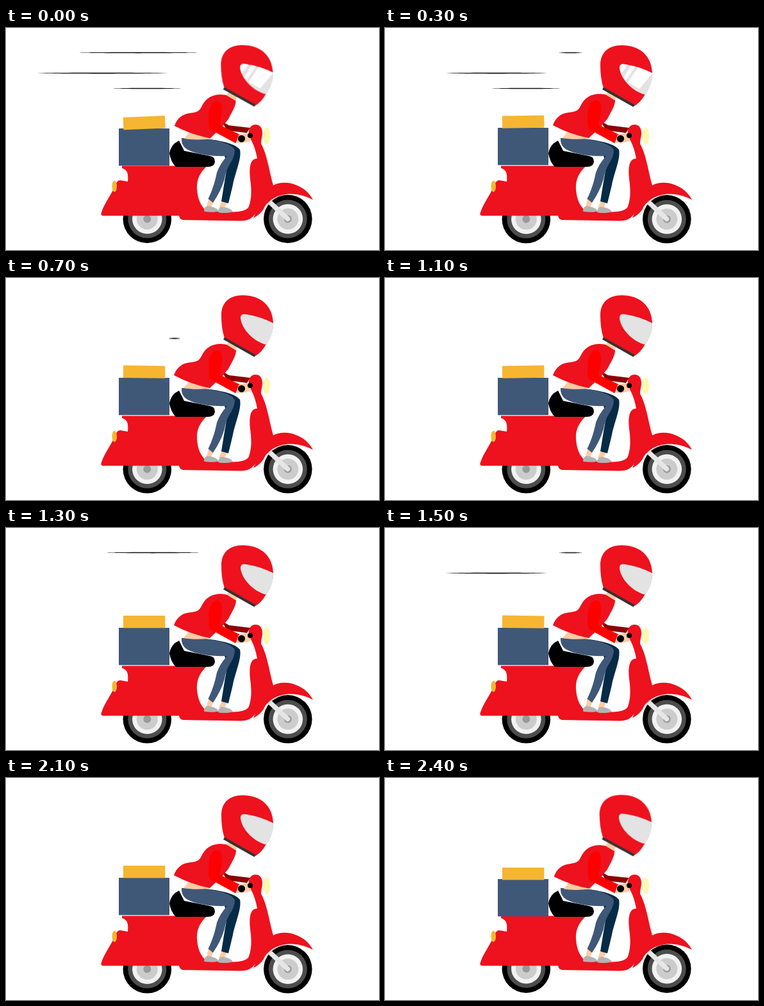
These frames come from a looping animation (582 px wide and 347 px high, 2.5 s). An HTML page without scripts:

```html
<!DOCTYPE html>
<html lang="en">
<head>
<meta charset="utf-8">
<title>Scooter delivery</title>
<style>
  /* --drop: 0 = rider lifted, 1 = rider settled */
  @property --drop { syntax: "<number>"; inherits: true; initial-value: 0; }
  @property --tilt { syntax: "<angle>"; inherits: true; initial-value: 0deg; }

  html, body { margin: 0; width: 100%; height: 100%; overflow: hidden; background: #fff; }
  svg { display: block; width: 582px; height: 347px; }

  .scene, .wind path, .shine { animation: 2500ms step-end infinite; }
  .scene { animation-name: bob, sway; }
  .shine { animation-name: shine; }

  .wheel { transform: translateY(calc(var(--drop) * -.7px)); }
  .crate { transform: translateY(calc(var(--drop) * 2px)); }
  .parcel {
    transform-origin: 215px 147px;
    transform: translateY(calc(var(--drop) * 1px)) rotate(var(--tilt));
  }
  .torso {
    transform-origin: 367px 173px;
    transform: rotate(calc(var(--drop) * -1deg)) scale(calc(1 - var(--drop) * .02));
  }
  .head {
    transform-origin: 360px 130px;
    transform: translateY(calc(var(--drop) * -.5px)) rotate(calc(var(--drop) * -1deg));
  }
  .wind .top { transform-origin: 309px 0; animation-name: gust-top; }
  .wind .mid { transform-origin: 257px 0; animation-name: gust-mid; }
  .wind .low { transform-origin: 271.6px 0; animation-name: gust-low; }

  .red { fill: #ed121d; }
  .navy { fill: #405878; }
  .skin { fill: #fdcba2; }
  .amber { fill: #f6b632; }

  @keyframes bob {
    0% { --drop: .5; }
    4%, 12%, 20%, 28%, 36%, 44%, 52%, 60%, 68%, 76%, 84%, 92% { --drop: 0; }
    8%, 16%, 24%, 32%, 40%, 48%, 56%, 64%, 72%, 80%, 88%, 96%, 100% { --drop: 1; }
  }
  @keyframes sway {
    0% { --tilt: -2.4deg; }
    12%, 44%, 76% { --tilt: -.9deg; }
    28%, 60%, 92% { --tilt: .7deg; }
    4%, 16%, 32%, 48%, 64%, 80%, 96%, 100% { --tilt: 0deg; }
  }
  @keyframes shine {
    0% { opacity: 1; }
    24%, 100% { opacity: 0; }
  }
  @keyframes gust-top {
    0%, 48% { transform: scaleX(1); }
    4%, 52% { transform: scaleX(.78); }
    8%, 56% { transform: scaleX(.49); }
    12%, 60% { transform: scaleX(.19); }
    16%, 64%, 100% { transform: scaleX(0); }
  }
  @keyframes gust-mid {
    0% { transform: scaleX(1); }
    8%, 56% { transform: scaleX(.97); }
    12%, 60% { transform: scaleX(.776); }
    16%, 64% { transform: scaleX(.49); }
    20%, 68% { transform: scaleX(.19); }
    24%, 72%, 100% { transform: scaleX(0); }
  }
  @keyframes gust-low {
    0% { transform: scaleX(1); }
    16%, 64% { transform: scaleX(.97); }
    20%, 68% { transform: scaleX(.78); }
    24%, 72% { transform: scaleX(.49); }
    28%, 76% { transform: scaleX(.17); }
    32%, 80%, 100% { transform: scaleX(0); }
  }
</style>
</head>
<body>
<svg viewBox="0 0 582 347">
  <defs>
    <g id="tyre">
      <circle r="37.8"/>
      <circle r="30" fill="#4d4d4d"/>
      <circle r="23.3" fill="#f2f2f2"/>
      <circle r="16.5" fill="#ccc"/>
      <circle r="6" fill="#999"/>
    </g>
    <path id="visor" d="M366 63C366 56 370 56 376 57Q396 60 417 70.500C417.500 86 411.500 98 405.500 104C386 99 368 80 366 63Z"/>
    <clipPath id="glass"><use href="#visor"/></clipPath>
  </defs>

  <g class="scene">
    <g class="wind" fill="#111">
      <path class="top" d="M110 38.600C150 37.600 263 37.600 303 38.600C263 39.700 150 39.700 110 38.600Z"/>
      <path class="mid" d="M43 70.500C90 69.400 210 69.400 257 70.500C210 71.700 90 71.700 43 70.500Z"/>
      <path class="low" d="M166 94.400C190 93.400 250 93.400 274 94.400C250 95.500 190 95.500 166 94.400Z"/>
    </g>

    <g class="wheel">
      <use href="#tyre" x="220.300" y="298.800"/>
      <use href="#tyre" x="439.800" y="298.800"/>
      <path d="M411 272L439.500 298.500" stroke="#e6e6e6" stroke-width="7.500" stroke-linecap="round"/>
    </g>

    <!-- scooter body, shield and front fender -->
    <path class="red" d="M181 215.500H314C302 226 297 238 298 252C299 267 304 278 311 284Q330 288 355 287.500Q372 287 378 281C384 268 383 250 381 236C379 218 381 204 392 204C390 193 387 183 382 174C375 163 380 151 389 151C397 151 400 157 400 164C400 170 398 174 398 181C402 188 405 197 407 205C411 219 413 233 417 246C428 240 443 241 454 246C466 251 474 259 479 268.500C465 261 452 259 440 259.500C426 261 416 266 410 272Q404 277 402 283Q396 292 386 297L389 290Q382 301.500 366 301.500L276 300Q271 299 270 293.500H151Q147 293 149 288C154 273 164 261 170 247Q173 238 178 238L190 240C191 228 190 222 181 219Z"/>
    <ellipse class="amber" cx="169.200" cy="247.500" rx="3.800" ry="8.800"/>
    <ellipse cx="406.500" cy="168.500" rx="5.600" ry="13" fill="#fdf8b0"/>

    <path d="M270 176Q257 182 255 196Q257 209 265 217H315Q325 217 326 209Q326 201 318 200L278 192Z"/>
    <g class="crate">
      <rect class="navy" x="176" y="156" width="79" height="58.300"/>
      <rect class="amber parcel" x="183" y="137" width="65.300" height="19.300"/>
    </g>

    <!-- legs -->
    <path class="skin" d="M317 264L324 271L320 280L313 279ZM337 270L345 273L341 281L332 281Z"/>
    <path d="M318 174Q356 179 365 190C368 204 358 225 354 245Q350 262 347 274L336 271Q340 245 345 217L340 195Z" fill="#052b47"/>
    <path class="navy" d="M274 172L312 173C336 177 354 182 357 191Q357 201 349 213Q343 223 341 236Q335 256 323 273L315.500 267C323 252 327 236 329 226Q334 212 345 200C319 201 298 197 285 191Q273 185 274 172Z"/>
    <path d="M309 286Q309 279 315 278Q328 280 332 286Q326 289 310 287ZM331 287Q332 280 337 279.500Q351 281 354 287Q347 290 332 288.500Z" fill="#b3b3b3"/>

    <!-- rider -->
    <g class="torso">
      <path d="M336 145L348 152L381 156L376 164L345 160Z" fill="#8b0005"/>
      <path class="skin" d="M287 160L318 166V173Q292 175 277 172Z"/>
      <path class="red" d="M262 152C266 140 275 133 287 132C299 131 302 128 305 122C311 109 321 103 335 103Q347 103 359 110C360 121 353 130 347 142L336 155L318 172Q288 166 262 152Z"/>
      <path class="skin" d="M350 98L362 104L358.500 113L344 104Z"/>
      <path d="M316 140C316 124 321 113 330 113C338 114 338 127 336 138L333 151L366 167L358 180L318 158Q315 151 316 140Z" fill="#f00"/>
    </g>
    <path class="skin" d="M363 167L376 164L382 169L381 177L368 180L359 179Z"/>
    <circle cx="381" cy="168" r="4"/>
    <circle cx="367.500" cy="173" r="5.600"/>

    <g class="head">
      <path class="red" d="M341 94C337 82 336 70 336 58C336 38 349 27 369 27C398 27 416 44 417 70C417 86 411 97 405 105Q399 116 389 122Z"/>
      <path d="M341 92.500L389.500 120L387.500 123.500L339 96Z" fill="#333"/>
      <use href="#visor" fill="#e3e3e3"/>
      <g clip-path="url(#glass)">
        <path class="shine" fill="#fff" d="M364 54H381L368 72ZM386 56L392 58L376 82L372 78ZM397 58L418 70L397 95L379 85Z"/>
      </g>
    </g>
  </g>
</svg>
</body>
</html>
```
